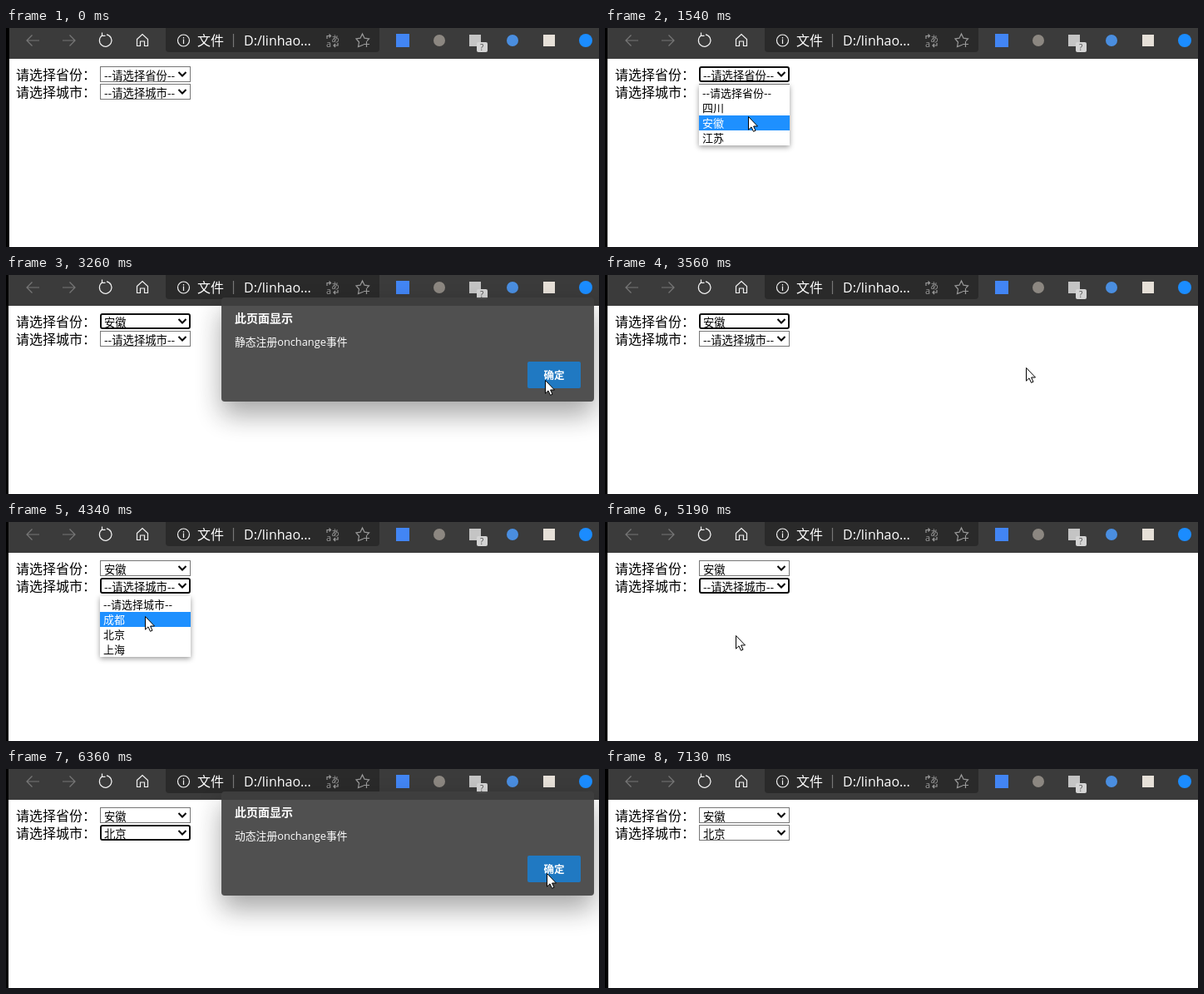
Recreate the animation shown at these times as an HTML page. Size 713 by 263 pixels, loop 7210 ms.

```html
<!DOCTYPE html>
<html lang="zh">
<head>
<meta charset="utf-8">
<style>
html, body { margin: 0; height: 100%; overflow: hidden; background: #fff; }
svg { display: block; width: 100vw; height: 100vh; }
text { font-family: "Open Sans", "Noto Sans CJK SC", "Noto Sans CJK", sans-serif; white-space: pre; }
.label, .value, .option { font-family: "Noto Sans CJK SC", "Noto Sans CJK", sans-serif; }
.label { font-size: 16px; }
.value { font-size: 13.33px; }
.option { font-size: 13px; }
.line { fill: none; stroke: #f2f2f2; stroke-width: 1.2; }
.dim { stroke: #777; }
.panel { filter: drop-shadow(0 2px 3px rgba(0,0,0,.4)); }
.card { filter: drop-shadow(0 16px 16px rgba(0,0,0,.38)); }
</style>
</head>
<body>
<svg viewBox="0 0 713 263">
  <rect width="713" height="263" fill="#fff"/>
  <rect width="713" height="37" fill="#3b3b3b"/>
  <rect id="edge" height="263"/>

  <path class="line dim" d="M40 15H25M31.500 8.500L25 15L31.500 21.500M68 15H83M76.500 8.500L83 15L76.500 21.500"/>
  <path class="line" d="M115.500 9A7.300 7.300 0 1 0 121 7.800M115.500 5.500V9.300H119.500"/>
  <path class="line" d="M157.500 13.500L164 7.500L170.500 13.500V21.500H166.500V16H161.500V21.500H157.500Z"/>
  <path d="M192 0H449V25Q449 29 445 29H196Q192 29 192 25Z" fill="#2a2a2a"/>
  <circle class="line" cx="213.500" cy="15" r="7"/>
  <path class="line" d="M213.500 13.500V19M213.500 11V12.500"/>
  <text x="230" y="21" font-size="16" fill="#fff">文件</text>
  <path class="line dim" d="M273.500 7V23"/>
  <text x="286" y="21" font-size="16" fill="#fff">D:/linhao...</text>
  <g fill="#999">
    <text x="391" y="17" font-size="10">あ</text>
    <text x="385" y="23" font-size="11">a</text>
  </g>
  <path class="line" style="stroke:#999" d="M386 13V9.500H390M388.500 7.500L390.500 9.500L388.500 11.500M399 18V21H394.500M396 19L394 21L396 23"/>
  <path class="line" style="stroke:#999" d="M430 20L423.500 22.500L424.500 17L421 13L426 12.200L428.500 7L431 12.200L436.500 13L434 15.500M433.500 16V23M430 19.500H437"/>

  <rect x="469" y="7" width="16" height="16" fill="#4285f4"/>
  <circle cx="521" cy="15" r="7" fill="#8c8781"/>
  <rect x="557" y="8" width="14" height="14" fill="#c4c4c4"/>
  <rect x="566" y="17" width="13" height="12" rx="2" fill="#d4d4d4"/>
  <text x="570" y="27" font-size="10" fill="#555">?</text>
  <circle cx="609" cy="15" r="7" fill="#4a8ee0"/>
  <rect x="646" y="8" width="14" height="14" fill="#e6e0d8"/>
  <circle cx="697" cy="15" r="8" fill="#1b8cff"/>

  <g id="form"></g>

  <g id="dialog">
    <rect class="card" x="259" y="33" width="448" height="125" rx="4" fill="#3f3f3f"/>
    <g fill="#fff">
      <text x="275" y="63" font-size="14" font-weight="700">此页面显示</text>
      <text id="message" x="275" y="91" font-size="12.800" font-weight="500"></text>
      <rect id="ok" x="627" y="110" width="64" height="32" rx="2"/>
      <text x="646.500" y="130.500" font-size="12.500" font-weight="600">确定</text>
    </g>
  </g>

  <path id="cursor" d="M.5 .5V16.200L4 12.900L6.500 18.300L9 17.200L6.600 12H11.500Z" fill="#fff" stroke="#000"/>
</svg>
<script>
const LOOP = 7210;
const $ = id => document.getElementById(id);
const clamp = v => Math.max(0, Math.min(1, v));

// Each menu: position, options, open and close times, blur time, when the choice lands
const menus = [
  { y: 46, label: '请选择省份：', options: ['--请选择省份--', '四川', '安徽', '江苏'],
    open: 850, close: 2020, blur: 4030, set: 3260, choice: 2 },
  { y: 67, label: '请选择城市：', options: ['--请选择城市--', '成都', '北京', '上海'],
    open: 4030, close: 5120, blur: 7130, set: 6360, choice: 2 }
];
const alerts = [
  { text: '静态注册onchange事件', show: 2060, press: 3100, hide: 3260 },
  { text: '动态注册onchange事件', show: 5200, press: 6200, hide: 6360 }
];
// time, x, y of the pointer tip
const path = [
  [70, 546, 212], [610, 212, 61], [1080, 212, 61], [1540, 172, 106],
  [2330, 172, 106], [2640, 649, 126], [2960, 649, 126], [2961, 648, 126],
  [3330, 648, 126], [3940, 207, 78], [4100, 207, 78], [4340, 167, 113],
  [4420, 167, 113], [4670, 157, 136], [5480, 157, 136], [5820, 650, 125],
  [6420, 650, 125], [6830, 560, 264]
];

$('form').innerHTML = menus.map(m => `
  <text class="label" x="12" y="${m.y + 16}">${m.label}</text>
  <rect class="box" fill="#fff"/>
  <text class="value" x="118" y="${m.y + 16}"></text>
  <path d="M207.500 ${m.y + 7}l4.500 4.500l4.500 -4.500" fill="none" stroke="#000" stroke-width="2"/>`).join('') +
  menus.map(m => `<g class="menu">
    <rect class="panel" x="113" y="${m.y + 22}" width="109" height="73" fill="#fff"/>
    <rect class="mark" x="113" width="109" height="18" fill="#1e90ff"/>
    ${m.options.map((o, i) => `<text class="option" x="117" y="${m.y + 36.500 + 18 * i}">${o}</text>`).join('')}
  </g>`).join('');

const all = s => [...document.querySelectorAll(s)];
const boxes = all('.box'), values = all('.value'), lists = all('.menu');
const show = (el, on) => el.setAttribute('visibility', on ? 'visible' : 'hidden');
const focused = (m, t) => t >= m.open && t < m.blur;
function set(el, attrs) {
  for (const k in attrs) el.setAttribute(k, attrs[k]);
}

function pointer(t) {
  const i = path.findIndex(p => p[0] > t);
  if (i < 1) return null;
  const [t0, x0, y0] = path[i - 1], [t1, x1, y1] = path[i];
  const p = (t - t0) / (t1 - t0), e = p * p * (3 - 2 * p);
  return [Math.round(x0 + (x1 - x0) * e), Math.round(y0 + (y1 - y0) * e)];
}

function drawMenu(m, i, t, tip) {
  const focus = focused(m, t), inset = focus ? 1 : .5;
  set(boxes[i], {
    x: 113 + inset, y: m.y + inset, width: 109 - 2 * inset, height: 19 - 2 * inset,
    rx: focus ? 2 : 0, stroke: focus ? '#101010' : '#767676', 'stroke-width': 2 * inset
  });
  values[i].textContent = m.options[t >= m.set ? m.choice : 0];
  const open = t >= m.open && t < m.close;
  show(lists[i], open);
  if (!open) return;
  const top = m.y + 23;
  const row = Math.max(0, Math.min(3, Math.floor((tip[1] - top) / 18)));
  set(lists[i].querySelector('.mark'), { y: top + 18 * row });
  lists[i].querySelectorAll('text').forEach((o, k) => set(o, { fill: k === row ? '#fff' : '#000' }));
}

function drawDialog(t, tip) {
  const a = alerts.find(a => t >= a.show && t < a.hide + 250);
  show($('dialog'), a);
  if (!a) return;
  let lift, alpha;
  if (t < a.hide) {
    const p = clamp((t - a.show) / 300);
    lift = 20 * (1 - p) ** 3;
    alpha = clamp(2 * p);
  } else {
    const p = .3 + .7 * clamp((t - a.hide) / 250);
    lift = 20 * p;
    alpha = 1 - p * p;
  }
  set($('dialog'), { transform: `translate(0 ${-Math.round(lift)})`, opacity: alpha });
  $('message').textContent = a.text;
  const hover = tip && tip[0] > 626 && tip[1] > 109;
  set($('ok'), { fill: t >= a.press ? '#0a6cbc' : hover ? '#1072c2' : '#006cbe' });
}

function frame(now) {
  const t = now % LOOP, tip = pointer(t);
  // the window border is one pixel thinner while the page has focus
  set($('edge'), { width: menus.some(m => focused(m, t)) ? 3 : 4 });
  menus.forEach((m, i) => drawMenu(m, i, t, tip));
  drawDialog(t, tip);
  show($('cursor'), tip);
  if (tip) set($('cursor'), { transform: `translate(${tip})` });
}

const start = performance.now();
(function tick() {
  frame(performance.now() - start);
  requestAnimationFrame(tick);
})();
</script>
</body>
</html>
```
